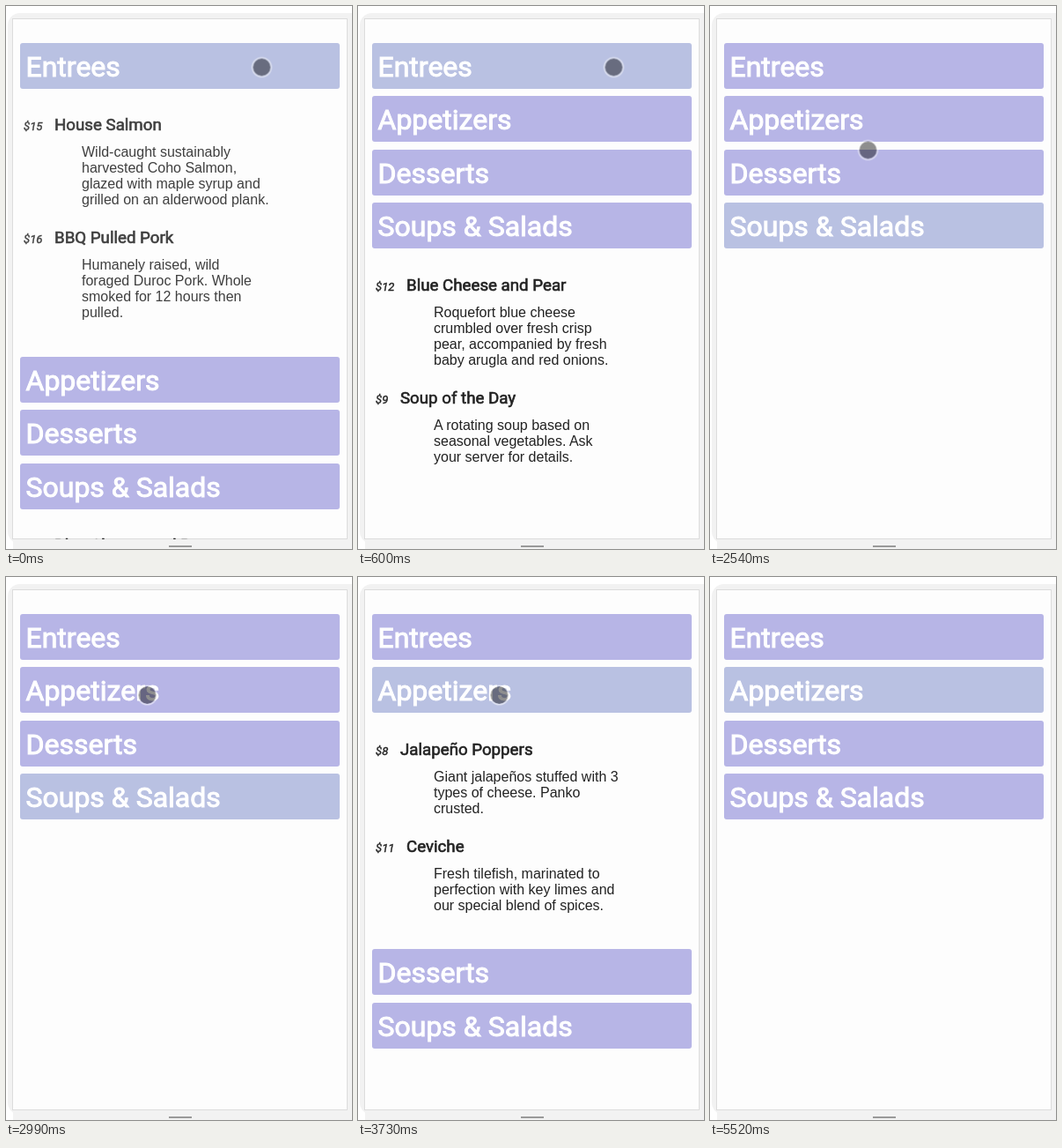
Animation of 393x616 px, one loop 6120 ms. Source, as an HTML page:

```html
<!DOCTYPE html>
<html lang="en">
<head>
<meta charset="utf-8">
<title>Menu accordion</title>
<style>
  html, body { margin: 0; width: 100%; height: 100%; overflow: hidden; background: #fff; }
  svg { display: block; }
  .bar { fill: #b7b5e6; }
  .head { font: 32px Roboto, sans-serif; fill: #fff; stroke: #fff; stroke-width: 1; }
  .panel { fill: #222; stroke: #222; stroke-width: 0; }
  .name { font: 18.72px Roboto, sans-serif; stroke-width: .65; }
  .price { font: italic 13.1px Roboto, sans-serif; stroke-width: .4; }
  .desc { font: 16px "Liberation Sans", Arial, sans-serif; }
</style>
</head>
<body>
<svg width="393" height="616" viewBox="0 0 393 616">
  <clipPath id="view"><rect x="8" y="14" width="379" height="591"/></clipPath>
  <rect x="2" y="8" width="410" height="602" rx="14" fill="#f2f2f2"/>
  <path d="M8 604H393V616H8Z" fill="#f2f2f2"/>
  <rect x="7.5" y="14.5" width="380" height="590" fill="#fdfdfd" stroke="#dcdcdc"/>
  <g id="menu" clip-path="url(#view)"></g>
  <path d="M185 613H211" stroke="#999" stroke-width="2"/>
  <g id="cursor">
    <circle r="10" fill="#000" fill-opacity=".44"/>
    <circle r="10.8" fill="none" stroke="#fff" stroke-opacity=".5" stroke-width="1.6"/>
  </g>
</svg>
<script>
const LOOP = 6120, PITCH = 60.4, TOP = 42, TEXT_TOP = 99.4;
const IDLE = '#b7b5e6', ACTIVE = '#b9c1e2';

const sections = [
  { title: 'Entrees', height: 295.6,
    show: [[0, .87], [150, 1], [600, 0]],
    active: [[0, 1], [1790, 0]],
    items: [
      ['$15', 'House Salmon', ['Wild-caught sustainably', 'harvested Coho Salmon,',
        'glazed with maple syrup and', 'grilled on an alderwood plank.']],
      ['$16', 'BBQ Pulled Pork', ['Humanely raised, wild', 'foraged Duroc Pork. Whole',
        'smoked for 12 hours then', 'pulled.']]
    ] },
  { title: 'Appetizers', height: 259.6,
    show: [[0, 0], [3290, .25], [3440, .57], [3580, .85], [3730, 1], [4630, 0]],
    active: [[0, 0], [3290, 1]],
    items: [
      ['$8', 'Jalapeño Poppers', ['Giant jalapeños stuffed with 3', 'types of cheese. Panko', 'crusted.']],
      ['$11', 'Ceviche', ['Fresh tilefish, marinated to', 'perfection with key limes and',
        'our special blend of spices.']]
    ] },
  { title: 'Desserts', height: 0, show: [[0, 0]], active: [[0, 0]], items: [] },
  { title: 'Soups & Salads', height: 277.6,
    show: [[0, 1], [1790, 0]],
    active: [[0, 0], [1790, 1], [3290, 0]],
    items: [
      ['$12', 'Blue Cheese and Pear', ['Roquefort blue cheese', 'crumbled over fresh crisp',
        'pear, accompanied by fresh', 'baby arugla and red onions.']],
      ['$9', 'Soup of the Day', ['A rotating soup based on', 'seasonal vegetables. Ask', 'your server for details.']]
    ] }
];

// time, x, y, scale
const pointer = [
  [0, 290.5, 69.5, 1], [750, 290.5, 74.5, 1], [900, 224.5, 258.5, 1], [1050, 221.5, 274.5, 1],
  [1200, 222, 274.5, 1], [1350, 222, 264, 1], [1490, 224.5, 262.5, 1], [2540, 179.5, 163.5, 1],
  [2690, 174.5, 154.5, 1], [2840, 171.5, 150.5, 1], [2990, 160.5, 134, 1],
  [5220, 182, 341, 1], [5370, 303, 614.5, .5], [5520, 303, 640, 0]
];

function add(parent, tag, attrs, text) {
  const el = document.createElementNS('http://www.w3.org/2000/svg', tag);
  for (const k in attrs) el.setAttribute(k, attrs[k]);
  if (text) el.textContent = text;
  return parent.appendChild(el);
}

// Play [time, value] steps as hard changes, looping forever.
function play(el, prop, steps) {
  const frames = steps.map(([t, v]) => ({ offset: t / LOOP, [prop]: v, easing: 'step-end' }));
  frames.push({ offset: 1, [prop]: steps[steps.length - 1][1] });
  el.animate(frames, { duration: LOOP, iterations: Infinity });
}

const valueAt = (steps, t) => steps.filter(s => s[0] <= t).pop()[1];
const move = y => `translate(0px, ${Math.round(y)}px)`;

function fillPanel(panel, items) {
  let y = 0;
  for (const [price, name, lines] of items) {
    add(panel, 'text', { class: 'price', x: 20, y }, price);
    add(panel, 'text', { class: 'name', x: price.length > 2 ? 55 : 48, y }, name);
    lines.forEach((line, i) => add(panel, 'text', { class: 'desc', x: 86, y: y + 30 + 18 * i }, line));
    y += lines.length * 18 + 56;
  }
}

const menu = document.getElementById('menu');
const layoutTimes = [0, 600, 1790, 3290, 4630];

sections.forEach((s, i) => {
  const panel = add(menu, 'g', { class: 'panel' });
  fillPanel(panel, s.items);
  const head = add(menu, 'g', {});
  const bar = add(head, 'rect', { class: 'bar', x: 16, width: 363, height: 52, rx: 3 });
  add(head, 'text', { class: 'head', x: 22.5, y: 38 }, s.title);

  const tops = layoutTimes.map(t => [t, sections.slice(0, i).reduce(
    (y, above) => y + (valueAt(above.show, t) ? above.height : 0), TOP + PITCH * i)]);
  play(head, 'transform', tops.map(([t, y]) => [t, move(y)]));
  play(panel, 'transform', tops.map(([t, y]) => [t, move(y + TEXT_TOP)]));
  play(panel, 'opacity', s.show);
  play(bar, 'fill', s.active.map(([t, on]) => [t, on ? ACTIVE : IDLE]));
});

play(document.getElementById('cursor'), 'transform',
  pointer.map(([t, x, y, k]) => [t, `translate(${x}px, ${y}px) scale(${k})`]));
</script>
</body>
</html>
```
